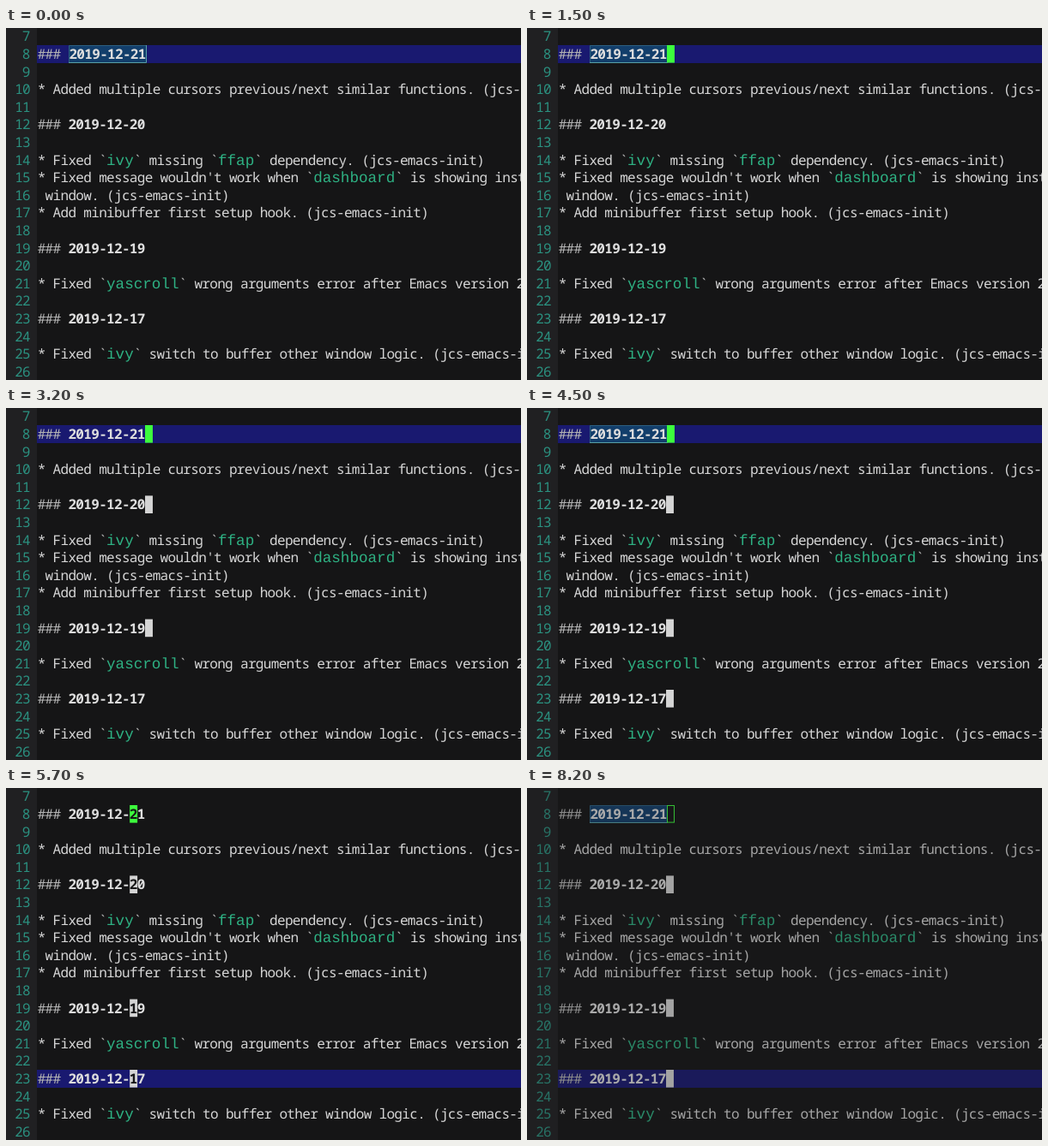
An HTML page for the animation above (8300 ms loop, 600 by 411 pixels).

```html
<!DOCTYPE html>
<html lang="en">
<head>
<meta charset="utf-8">
<title>Multiple cursors</title>
<style>
  html, body { margin: 0; height: 100%; overflow: hidden; background: #151516; }
  svg { display: block; width: 600px; height: 411px; }
  text {
    font: 16px "Noto Sans Mono", monospace;
    letter-spacing: -0.67px;
    white-space: pre;
    text-rendering: geometricPrecision;
    fill: #d6d6d6;
  }
  .num { fill: #2b9180; }
  .mark { fill: #b4b4b4; }
  .date { font-weight: 700; fill: #dedede; }
  .code {
    font: 17.6px "Liberation Mono", monospace;
    letter-spacing: 0;
    fill: #2eb183;
  }
  .under { fill: #151516; }
</style>
</head>
<body>
<svg id="stage" viewBox="0 0 600 411"></svg>
<script>
(() => {
  const LOOP = 8300, LEFT = 37, CELL = 8.93, WIDE = 10.56, ROW = 20.6;
  const GREEN = '#3dfc3d', PALE = '#d4d4d4';
  const stage = document.getElementById('stage');

  const lines = {
    8: '### 2019-12-21',
    10: '* Added multiple cursors previous/next similar functions. (jcs-emacs-init)',
    12: '### 2019-12-20',
    14: '* Fixed `ivy` missing `ffap` dependency. (jcs-emacs-init)',
    15: "* Fixed message wouldn't work when `dashboard` is showing instead",
    16: ' window. (jcs-emacs-init)',
    17: '* Add minibuffer first setup hook. (jcs-emacs-init)',
    19: '### 2019-12-19',
    21: '* Fixed `yascroll` wrong arguments error after Emacs version 26',
    23: '### 2019-12-17',
    25: '* Fixed `ivy` switch to buffer other window logic. (jcs-emacs-init)'
  };

  // Times in ms
  const added = [2700, 3200, 3700];
  const moves = [[4600, 12], [4700, 11], [4800, 9], [4900, 8], [5000, 4],
                 [5400, 8], [5500, 9], [5600, 11], [5700, 12], [5800, 14]];
  const unboxed = [[2700, 3000], [3200, 3500], [3700, 4100], [4600, 5200], [5400, 6100]];
  const blinkOff = [[0, 400], [900, 1500], [1900, 2300]];
  const rowJump = 4600, focusLost = 8000;

  const rowTop = row => 20 + (row - 8) * ROW;
  const within = (t, spans) => spans.some(([a, b]) => t >= a && t < b);
  const show = (node, on) => node.setAttribute('visibility', on ? 'visible' : 'hidden');

  function add(tag, attrs, parent = stage) {
    const node = document.createElementNS('http://www.w3.org/2000/svg', tag);
    for (const key in attrs) node.setAttribute(key, attrs[key]);
    return parent.appendChild(node);
  }

  function rect(x, y, width, height, fill) {
    return add('rect', { x, y, width, height, fill });
  }

  function write(str, x, row, cls) {
    const node = add('text', { x: x - 0.3, y: rowTop(row) + 16, class: cls });
    node.textContent = str;
    return node;
  }

  rect(0, 0, 600, 411, '#151516');
  rect(0, 0, 36, 411, '#202022');
  const band = rect(36, 0, 564, 21, '#191970');
  const box = add('g', {});
  add('rect', { x: 73, y: 20.5, width: 90, height: 20, fill: '#123e6b' }, box);
  add('path', { d: 'M73.5 40V20.5H163', fill: 'none', stroke: '#2c5f80' }, box);
  add('path', { d: 'M73 40.5H163.5V20', fill: 'none', stroke: '#58a0a6' }, box);

  const cursors = [];
  for (let row = 7; row <= 26; row++) {
    write(String(row), row < 10 ? 19 : 10.5, row, 'num');
    const line = lines[row] || '';
    if (line.startsWith('#')) {
      write('###', LEFT, row, 'mark');
      const block = rect(0, 0, CELL, ROW, PALE);
      const text = write('', 0, row, 'date');
      const parts = ['', 'under', ''].map(cls => add('tspan', { class: cls }, text));
      cursors.push({ row, block, text, parts, date: line.slice(4) });
      continue;
    }
    let x = LEFT;
    line.split('`').forEach((part, i) => {
      if (i) {
        write('`', x, row, 'mark');
        x += CELL;
      }
      write(part, x, row, i % 2 ? 'code' : '');
      x += part.length * (i % 2 ? WIDE : CELL);
    });
  }
  const shade = rect(0, 0, 600, 411, '#1e1e1e');

  function drawCursor({ row, block, text, parts, date }, col, on, boxed, fill, hollow) {
    const shift = boxed ? 1 : 0;
    const inset = hollow ? 0.5 : 0;
    const at = on ? col - 4 : date.length;
    block.setAttribute('x', LEFT + col * CELL + shift + inset);
    block.setAttribute('y', rowTop(row) + inset);
    block.setAttribute('width', CELL - 2 * inset);
    block.setAttribute('height', ROW - 2 * inset);
    block.setAttribute('fill', hollow ? 'none' : fill);
    block.setAttribute('stroke', hollow ? fill : 'none');
    show(block, on);
    text.setAttribute('x', LEFT + 4 * CELL + shift - 0.3);
    parts[0].textContent = date.slice(0, at);
    parts[1].textContent = date.slice(at, at + 1);
    parts[2].textContent = date.slice(at + 1);
  }

  function draw(t) {
    const count = 1 + added.filter(s => t >= s).length;
    const col = moves.reduce((c, [s, to]) => t >= s ? to : c, 14);
    const boxed = !within(t, unboxed);
    show(box, boxed);
    band.setAttribute('y', Math.round(rowTop(t < rowJump ? 8 : 23)));
    const [main, ...others] = cursors;
    drawCursor(main, col, !within(t, blinkOff), boxed, GREEN, t >= focusLost);
    others.forEach((cursor, i) => drawCursor(cursor, col, i + 1 < count, false, PALE, false));
    const dim = t < focusLost ? 0 : 0.09 * (1 + Math.floor((t - focusLost) / 100));
    shade.setAttribute('opacity', dim);
  }

  function tick() {
    draw(performance.now() % LOOP);
    requestAnimationFrame(tick);
  }
  tick();
})();
</script>
</body>
</html>
```
